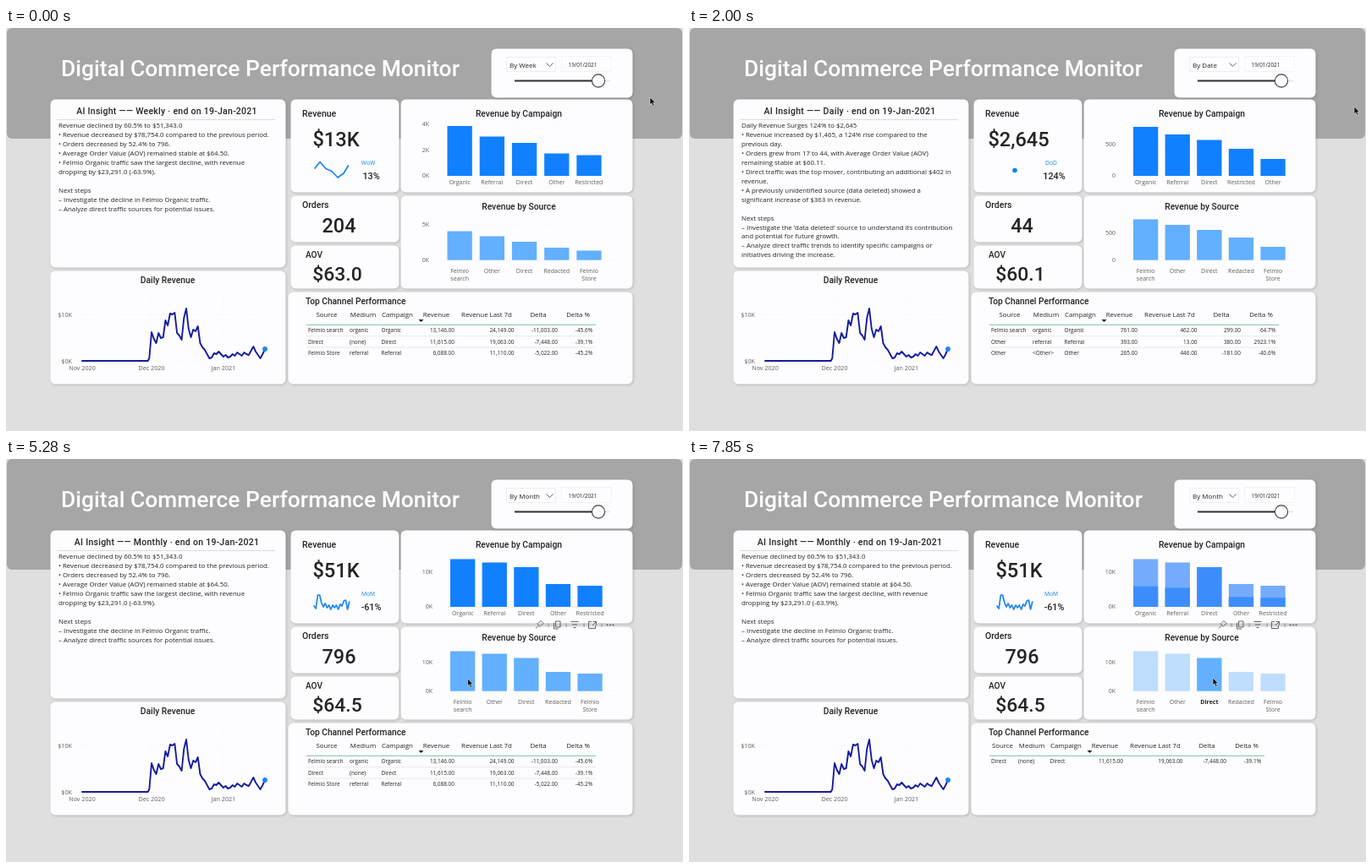
Recreate the animation shown at these times as an HTML page. Size 800 by 477 pixels, loop 8 s.

```html
<!DOCTYPE html>
<html lang="en">
<head>
<meta charset="utf-8">
<title>Commerce dashboard</title>
<style>
html, body { margin: 0; width: 100%; height: 100%; overflow: hidden; background: #dfdfdf; }
svg { display: block; width: 800px; height: 477px; }
text { font-family: "Open Sans", "Noto Sans", sans-serif; fill: #252423; white-space: pre; }
.din { font-family: Roboto, "Liberation Sans", sans-serif; }
.card { fill: #fdfcfe; filter: drop-shadow(1px 1px 1.5px rgba(0,0,0,.18)); }
.grid { stroke: #efeef2; stroke-width: .7; stroke-dasharray: 1 2; }
.icon { fill: none; stroke: #555; stroke-width: .9; }
</style>
</head>
<body>
<svg viewBox="0 0 800 477"><g id="base"></g><g id="live"></g></svg>
<script>
const STEPS = 56, LOOP = 8000;
const AXIS = "#605e5c", BLUE = [17, 128, 255], DIM = [163, 193, 249], SKY = "#62b0ff", PALE = "#bfddfc";

const esc = s => String(s).replace(/&/g, "&amp;").replace(/</g, "&lt;");
// y is the middle of the capitals
const text = (x, y, s, size, o = {}) =>
  `<text x="${x}" y="${y + size * .355}" font-size="${size}" text-anchor="${o.at || "start"}"` +
  ` class="${o.cls || ""}" font-weight="${o.weight || 400}" letter-spacing="${o.ls || 0}"` +
  (o.fill ? ` style="fill:${o.fill}"` : "") + `>${esc(s)}</text>`;
const din = (x, y, s, size, o = {}) => text(x, y, s, size, { weight: 500, ...o, cls: "din" });
const rect = (x, y, w, h, fill, extra = "") =>
  `<rect x="${x}" y="${y}" width="${w}" height="${h}" fill="${fill}" ${extra}/>`;
const line = (x1, y1, x2, y2, extra) => `<line x1="${x1}" y1="${y1}" x2="${x2}" y2="${y2}" ${extra}/>`;
const poly = (pts, color, w) =>
  `<polyline points="${pts.join(" ")}" fill="none" stroke="${color}" stroke-width="${w}" stroke-linejoin="round" stroke-linecap="round"/>`;
const card = (x, y, r, b) =>
  `<rect class="card" x="${x - .5}" y="${y - .5}" width="${r - x + 1}" height="${b - y + 1}" rx="6"/>`;
const mix = (a, b, k) => `rgb(${a.map((v, i) => Math.round(v + (b[i] - v) * k))})`;

const NEXT = ["", "Next steps"];
const VIEWS = {
  day: {
    pick: "By Date", name: "Daily", change: "DoD", pct: "124%", revenue: "$2,645", orders: "44", aov: "$60.1",
    left: 525, gap: 37.6,
    campaign: { names: ["Organic", "Referral", "Direct", "Restricted", "Other"], tops: [117, 126, 132.5, 143, 155], ticks: { 500: 138, 0: 175 } },
    source: { tops: [226.5, 233, 239, 248, 259], ticks: { 500: 243, 0: 274.5 } },
    insight: ["Daily Revenue Surges 124% to $2,645", "• Revenue increased by $1,465, a 124% rise compared to the",
      "previous day.", "• Orders grew from 17 to 44, with Average Order Value (AOV)", "remaining stable at $60.11.",
      "• Direct traffic was the top mover, contributing an additional $402 in", "revenue.",
      "• A previously unidentified source (data deleted) showed a", "significant increase of $363 in revenue.", ...NEXT,
      "– Investigate the 'data deleted' source to understand its contribution", "and potential for future growth.",
      "– Analyze direct traffic trends to identify specific campaigns or", "initiatives driving the increase."],
    rows: ["Felmio search|organic|Organic|761.00|462.00|299.00|64.7%", "Other|referral|Referral|393.00|13.00|380.00|2923.1%",
      "Other|<Other>|Other|265.00|446.00|-181.00|-40.6%"]
  },
  week: {
    pick: "By Week", name: "Weekly", change: "WoW", pct: "13%", revenue: "$13K", orders: "204", aov: "$63.0",
    left: 521.5, gap: 38.2,
    campaign: { names: ["Organic", "Referral", "Direct", "Other", "Restricted"], tops: [116, 128.5, 136, 148.5, 150.5], ticks: { "4K": 114, "2K": 145, "0K": 175 } },
    source: { tops: [240.5, 246.5, 253, 260, 263.5], ticks: { "5K": 233, "0K": 274.5 } },
    insight: ["Revenue increased by 12.88% WoW", "• Revenue increased by $1,467 (12.88%) to $12,856 this week.",
      "• Organic Felmio traffic drove the largest increase in revenue, up", "$987 (34%).",
      "• Referral traffic from '<Other>' also significantly boosted revenue,", "increasing by $896 (101%).",
      "• Direct traffic saw the largest decline, decreasing by $782 (23.43%).", ...NEXT,
      "– Investigate the drivers behind the surge in organic Felmio and", "'<Other>' referral revenue.",
      "– Analyze the decline in direct traffic to identify potential issues or", "shifts in user behavior."],
    rows: ["Felmio search|organic|Organic|3,890.00|2,903.00|987.00|34.0%", "Direct|(none)|Direct|2,556.00|3,338.00|-782.00|-23.4%",
      "Other|referral|Referral|1,781.00|885.00|896.00|101.2%"]
  },
  month: {
    pick: "By Month", name: "Monthly", change: "MoM", pct: "-61%", revenue: "$51K", orders: "796", aov: "$64.5",
    left: 525, gap: 37.6,
    campaign: { names: ["Organic", "Referral", "Direct", "Other", "Restricted"], tops: [118.5, 122.5, 128, 148, 150], ticks: { "10K": 134, "0K": 175 } },
    source: { tops: [227.5, 230.5, 235.5, 252, 254], ticks: { "10K": 240.5, "0K": 274.5 } },
    insight: ["Revenue declined by 60.5% to $51,343.0", "• Revenue decreased by $78,754.0 compared to the previous period.",
      "• Orders decreased by 52.4% to 796.", "• Average Order Value (AOV) remained stable at $64.50.",
      "• Felmio Organic traffic saw the largest decline, with revenue", "dropping by $23,291.0 (-63.9%).", ...NEXT,
      "– Investigate the decline in Felmio Organic traffic.", "– Analyze direct traffic sources for potential issues."],
    rows: ["Felmio search|organic|Organic|13,146.00|24,149.00|-11,003.00|-45.6%", "Direct|(none)|Direct|11,615.00|19,063.00|-7,448.00|-39.1%",
      "Felmio Store|referral|Referral|6,088.00|11,110.00|-5,022.00|-45.2%"]
  }
};
const SOURCES = ["Felmio search", "Other", "Direct", "Redacted", "Felmio Store"];
const SEARCH_ROWS = [VIEWS.month.rows[0], "Felmio search|cpc|Other|824.00|2,432.00|-1,608.00|-66.1%"];
// share of each campaign bar kept by a selected source
const KEEP = { 0: [.955, 0, 0, .125, 0], 2: [0, 0, 1, 0, 0] };

// [step, value], held until the next one
const VIEW = [[0, "week"], [11, "day"], [24, "month"]];
const REPORT = [[0, "month"], [3, "week"], [13, "day"], [27, "month"]];
const ROWS = [[0, null], [39, SEARCH_ROWS], [48, null], [55, [VIEWS.month.rows[1]]]];
const POPUP = [[0, false], [8, true], [11, false], [21, true], [24, false]];
const PICKED = [[0, -1], [38, 0], [47, -1], [54, 2]];
const FILTER = [[0, -1], [38, 0], [52, -1], [54, 2]];
const SPREAD = [[0, 1], [38, .85], [39, .43], [40, .2], [41, .08], [42, 0], [48, .04], [49, .3], [50, .65], [51, .9], [52, 1], [54, .85], [55, .43]];
const held = (track, i) => track.filter(k => k[0] <= i).pop()[1];

// [step, x, y], joined by straight moves
const PATH = [[0, 761, 82], [2, 770, 79], [3, 755, 72], [5, 670, 47], [6, 643, 44], [8, 643, 44], [9, 638, 57], [10, 628, 60],
  [11, 640, 62], [14, 786, 93], [16, 787, 92], [17, 782, 90], [20, 645, 44], [21, 643, 44], [23, 628, 76], [28, 630, 78],
  [31, 640, 91], [32, 634, 100], [37, 545.5, 260], [41, 545.5, 260], [45, 584, 264], [49, 584, 264], [53, 619, 259], [55, 619, 259]];
function pointer(i) {
  const n = Math.max(1, PATH.findIndex(p => p[0] >= i));
  const a = PATH[n - 1], b = PATH[n], k = (i - a[0]) / (b[0] - a[0]);
  return [a[1] + (b[1] - a[1]) * k, a[2] + (b[2] - a[2]) * k];
}

function base() {
  const days = [391, 360, 368, 373, 361, 367, 366, 346, 352, 338, 339, 337, 361, 364, 369, 343, 332, 356, 366, 357, 359, 353, 373,
    378, 381, 386, 391, 390, 385, 386, 383, 386, 389, 387, 390, 389, 386, 388, 384, 386, 388, 384, 386, 387, 382, 377, 383, 387, 391, 386, 380];
  const x = d => 90 + d * 216 / 79;
  const pts = [[90, 394], [x(28.4), 394], ...days.map((y, n) => [x(29 + n), y])];
  return rect(1, 0, 798, 131, "#a6a6a6", 'rx="6"') +
    din(65, 47.5, "Digital Commerce Performance Monitor", 26.4, { fill: "#fff" }) +
    card(53, 85, 330, 283) + card(53, 288, 330, 421) + card(337, 85, 464, 194) + card(337, 199, 464, 253) +
    card(337, 258, 464, 308) + card(467, 85, 740, 194) + card(467, 199, 740, 308) + card(334, 313, 740, 421) + card(574, 25, 740, 82) +
    line(60, 108.5, 318, 108.5, 'stroke="#d6d5d8" stroke-width=".8"') +
    din(350, 101.5, "Revenue", 10.5) + din(350, 209.5, "Orders", 10.5) + din(354, 268, "AOV", 10.1) +
    din(606, 101.5, "Revenue by Campaign", 10.3, { at: "middle" }) +
    din(606, 211, "Revenue by Source", 10.3, { at: "middle" }) +
    din(191, 298.5, "Daily Revenue", 10.3, { at: "middle" }) +
    din(354, 323.5, "Top Channel Performance", 10.2) +
    line(84, 339.5, 312, 339.5, 'class="grid"') + line(84, 394, 312, 394, 'class="grid"') +
    [[90, "Nov 2020"], [172, "Dec 2020"], [257, "Jan 2021"]].map(([cx, s]) =>
      line(cx, 314, cx, 394, 'class="grid"') + text(cx, 402, s, 7.2, { at: "middle", fill: AXIS })).join("") +
    text(78, 339.5, "$10K", 7.2, { at: "end", fill: AXIS }) + text(78, 394, "$0K", 7.2, { at: "end", fill: AXIS }) +
    poly(pts, "#141c9c", 1.9) + '<circle cx="306" cy="380" r="2.9" fill="#1a84f5"/>' +
    rect(591.5, 34.5, 58, 17, "none", 'stroke="#ebeaed" stroke-width=".8"') +
    rect(656.5, 33.5, 59, 18, "none", 'stroke="#f0eff2" stroke-width=".8"') +
    text(664.5, 43.8, "19/01/2021", 6.4) +
    line(708, 62.5, 714, 62.5, 'stroke="#e6e6e6" stroke-width="1.5"') +
    line(601, 62.5, 693, 62.5, 'stroke="#303030" stroke-width="2"') +
    '<circle cx="700" cy="62.5" r="7.6" fill="#fdfcfe" stroke="#404040" stroke-width="1.1"/>';
}

const ticks = (chart, edge) => Object.entries(chart.ticks).map(([s, y]) =>
  line(510, y, 722, y, 'class="grid"') + text(edge, y, s, 7, { at: "end", fill: AXIS })).join("");

function charts(v, i) {
  const edge = v.name === "Weekly" ? 500 : 504, w = 29.3;
  const picked = held(PICKED, i), filter = held(FILTER, i), k = held(SPREAD, i);
  let out = ticks(v.campaign, edge) + ticks(v.source, edge);
  for (let n = 0; n < 5; n++) {
    const x = v.left + n * v.gap, mid = x + w / 2, top = v.campaign.tops[n], h = 175 - top;
    if (filter < 0) out += rect(x, top, w, h, mix(BLUE, DIM, 0));
    else {
      const keep = KEEP[filter][n], part = h * (keep + (1 - keep) * k);
      out += rect(x, top, w, h, mix(DIM, BLUE, k * .75)) +
        rect(x, 175 - part, w, part, mix(BLUE, [120, 160, 248], Math.min(k, 1 - k)));
    }
    out += text(mid, 182.3, v.campaign.names[n], 7.05, { at: "middle", fill: AXIS });
    const y = v.source.tops[n], on = picked === n;
    out += rect(x, y, w, 274.7 - y, picked < 0 || on ? SKY : PALE);
    SOURCES[n].split(" ").forEach((s, r) =>
      out += text(mid, 287 + r * 9.6, s, 7.05, { at: "middle", fill: on ? "#252423" : AXIS, weight: on ? 700 : 400 }));
  }
  return out;
}

function kpis(v) {
  const mid = v.name === "Daily" ? 389.5 : 390, spark = {
    Daily: '<circle cx="385" cy="168.5" r="2.8" fill="#1180ff"/>',
    Weekly: poly([[365, 166], [371, 158.5], [378, 166.5], [385, 169.5], [392, 177], [399, 172], [404.5, 163]], "#1a84f5", 1.7),
    Monthly: poly([174, 177, 161, 161, 170, 175, 171, 176, 173, 178, 173, 176, 173, 178, 172, 174, 168, 167, 178, 169]
      .map((y, n) => [364 + n * 2.2, y]), "#1a84f5", 1.7)
  };
  return din(mid, 132, v.revenue, 23.6, { at: "middle" }) + din(393.5, 234, v.orders, 23.4, { at: "middle" }) +
    din(391.5, 291, v.aov, 22.9, { at: "middle" }) + spark[v.name] +
    text(428, 159.5, v.change, 6.7, { at: "middle", fill: "#1a84e0" }) + din(431.5, 175.5, v.pct, 10.8, { at: "middle" });
}

function insight(view, report) {
  return din(190, 98, `AI Insight —— ${view.name} · end on 19-Jan-2021`, 10.5, { at: "middle", ls: .27 }) +
    report.insight.map((s, n) => text(62, 115.3 + n * 10.95, s, 7.86)).join("");
}

function table(rows) {
  const narrow = rows.length === 1, s = narrow ? -17 : 0;
  const heads = [["Source", narrow ? 370.5 : 379], ["Medium", 422 + s], ["Campaign", 462.5 + s], ["Revenue", 508.5 + s],
    ["Revenue Last 7d", 568 + s], ["Delta", 629 + s], ["Delta %", 676 + s]];
  const cols = [357, 406 + s, 443.5 + s, 530 + s, 600.5 + s, 652 + s, 693 + s];
  let out = heads.map(([h, x]) => text(x, 339.5, h, 7.85, { at: "middle" })).join("") +
    `<path d="M${487.5 + s} 345h6l-3 3z" fill="#222"/>` +
    line(355, 351.3, 697 + s, 351.3, 'stroke="#7fbfb2" stroke-width="1"');
  rows.forEach((row, r) => {
    const y = 358.2 + r * 13.3;
    if (r) out += line(355, y - 6.8, 697, y - 6.8, 'stroke="#e4e3e6" stroke-width=".8"');
    row.split("|").forEach((c, n) => out += text(cols[n], y, c, 6.45, { at: n > 2 ? "end" : "start" }));
  });
  return out;
}

function slicer(v, open) {
  const c = open ? "M638.5 46l4-4 4 4" : "M638.5 41.5l4 4 4-4";
  let out = text(595, 44, v.pick, 8) + `<path d="${c}" fill="none" stroke="#555" stroke-width=".9"/>`;
  if (!open) return out;
  out += rect(590.5, 52, 59, 126.5, "#fdfcfe", 'style="filter:drop-shadow(0 1px 1px rgba(0,0,0,.12))"') + rect(591, 53, 58, 15, "#f3f2f5");
  ["By Date", "By Month", "By Week", "Total"].forEach((s, n) => {
    const y = 60.3 + n * 16.2, on = s === v.pick;
    out += `<circle cx="600.5" cy="${y}" r="3.2" fill="#fff" stroke="#555" stroke-width=".8"/>` +
      (on ? `<circle cx="600.5" cy="${y}" r="2" fill="#222"/>` : "") + text(610, y + .5, s, 8);
  });
  return out;
}

function toolbar(y) {
  const marks = [641, 662, 683, 704].map(x => rect(x - .8, y - 2, 1.8, 4, "#aaa")).join("");
  return `<g transform="translate(0 ${y})" class="icon"><path d="M626 4l3-3m-1.500-3l4 4m-2.500-4l3-3 3 3-3 3"/>` +
    '<path d="M649.500-4.500h5.500v7h-5.500zm-2 2v7h5.500"/><path d="M667.500-4h9m-7.500 3.500h6m-4.500 3.500h3"/>' +
    '<path d="M692-4h-3.500v8h8v-3.500m-3-4.500h4v4m0-4l-4.500 4.500"/>' +
    [710.5, 714, 717.5].map(x => `<circle cx="${x}" cy="0" r=".6" fill="#444"/>`).join("") + "</g>" + marks;
}

function tooltip() {
  const rows = [["Source (display)", "Felmio search"], ["Revenue_attribution", "13,970.00"], ["First SOURCE", "felmio"]];
  return '<path d="M352 248.500h186v3l7 8-7 8v50h-186z" fill="#fff" style="filter:drop-shadow(0 1px 3px rgba(0,0,0,.3))"/>' +
    rows.map(([a, b], n) => text(453, 268.8 + n * 15, a, 9.35, { at: "end" }) + text(462, 268.8 + n * 15, b, 9.35)).join("");
}

function mouse(x, y, hand) {
  const d = hand
    ? "M-1 5v-6q1-1.500 2 0v3.500l4 1v4l-1.500 3h-4l-3-4.500q0-1.500 1.500-.5z"
    : "M0 0v8.800l2-1.800 1.500 3.200 1.600-.7-1.500-3.100h2.800z";
  return `<path transform="translate(${x} ${y})" d="${d}" fill="${hand ? "#fff" : "#111"}" stroke="${hand ? "#222" : "#fff"}" stroke-width="${hand ? .9 : .5}"/>`;
}

function scene(i) {
  const view = VIEWS[held(VIEW, i)], report = VIEWS[held(REPORT, i)], open = held(POPUP, i);
  const [x, y] = pointer(i);
  const inSlicer = !open && x > 574 && x < 740 && y > 25 && y < 83;
  const inSource = x > 467 && x < 740 && y > 199 && y < 308;
  return insight(view, report) + kpis(view) + charts(view, i) + table(held(ROWS, i) || report.rows) + slicer(view, open) +
    (inSlicer ? toolbar(15) : "") + (inSource ? toolbar(196.5) : "") +
    (i >= 39 && i <= 41 ? tooltip() : "") + mouse(x, y, open);
}

const live = document.getElementById("live");
document.getElementById("base").innerHTML = base();
const start = performance.now();
let shown = -1;
function tick() {
  const t = performance.now() - start;
  const i = Math.floor((t + 12) / (LOOP / STEPS)) % STEPS;
  if (i !== shown) live.innerHTML = scene(shown = i);
  requestAnimationFrame(tick);
}
tick();
</script>
</body>
</html>
```
